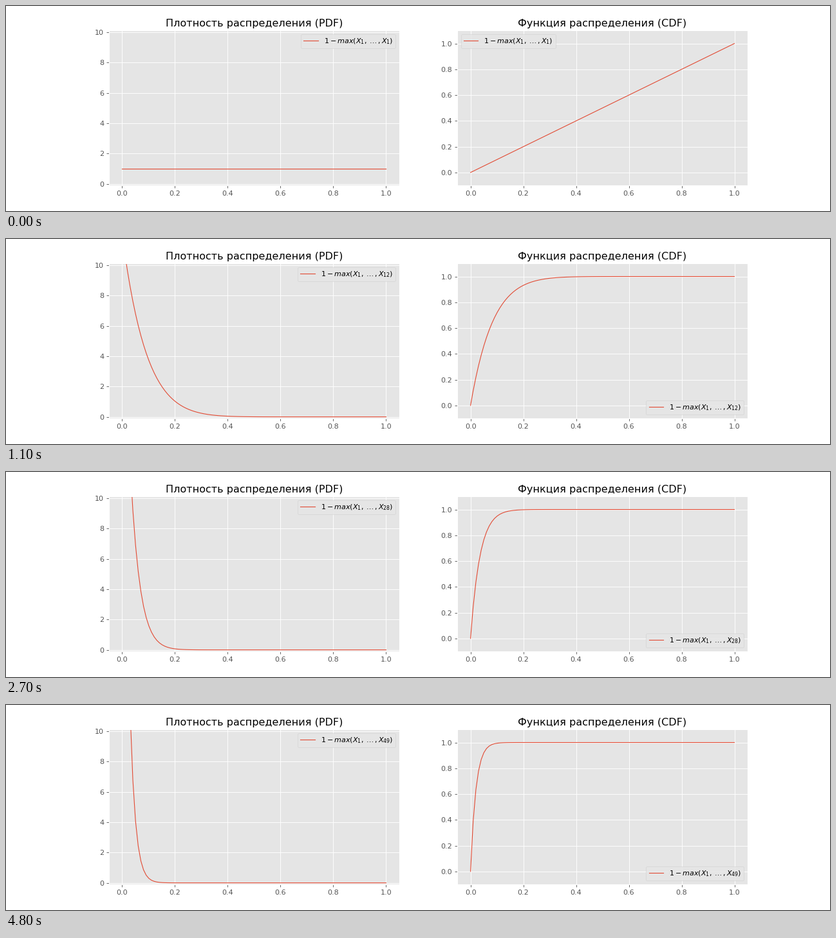
Recreate the animation shown at these times as a matplotlib script. Size 1280 by 320 pixels, loop 4.9 s.

```python
import matplotlib.pyplot as plt
import numpy as np
from matplotlib.animation import FuncAnimation

plt.style.use("ggplot")
plt.rcParams["font.family"] = "DejaVu Sans"

COUNT = 49
INTERVAL = 100

x = np.linspace(0, 1, 100)


def pdf(n):
    return n * (1 - x) ** (n - 1)


def cdf(n):
    return 1 - (1 - x) ** n


fig, axes = plt.subplots(1, 2, figsize=(16, 4), dpi=80)
fig.subplots_adjust(left=0.125, right=0.9, bottom=0.125, top=0.88, wspace=0.2)

panels = [
    ("Плотность распределения (PDF)", (-0.1, 10.1), pdf),
    ("Функция распределения (CDF)", (-0.1, 1.1), cdf),
]

curves = []
for ax, (title, ylim, func) in zip(axes, panels):
    ax.set_title(title)
    ax.set_xlim(-0.05, 1.05)
    ax.set_ylim(*ylim)
    line, = ax.plot(x, func(1), lw=1)
    curves.append((ax, line, func))


def update(frame):
    n = frame + 1
    for ax, line, func in curves:
        line.set_ydata(func(n))
        line.set_label(rf"$1 - max(X_1, \dots, X_{{{n}}})$")
        ax.legend(loc="best")
    return [line for _, line, _ in curves]


anim = FuncAnimation(fig, update, frames=COUNT, interval=INTERVAL,
                     init_func=lambda: update(0), repeat=True, repeat_delay=0)
plt.show()
```
